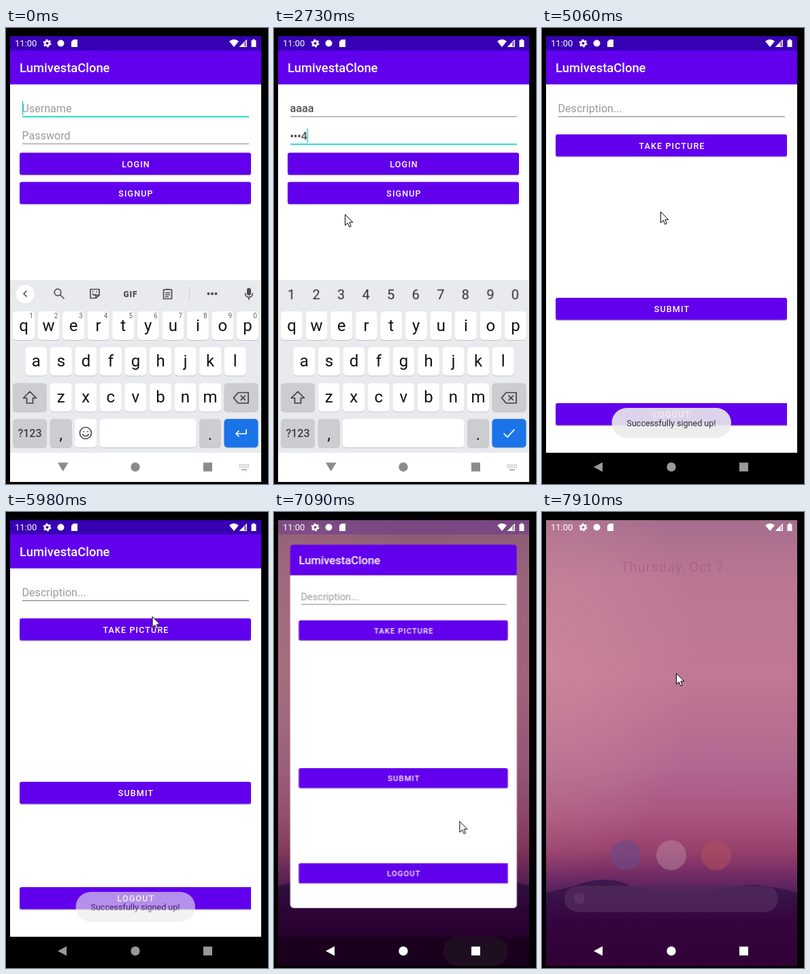
An HTML page that plays this animation: 385 by 671 pixels, repeating every 8 s.

```html
<!DOCTYPE html>
<html lang="en">
<head>
<meta charset="utf-8">
<title>Sign up demo</title>
<style>
  html, body { margin: 0; width: 100%; height: 100%; overflow: hidden; background: #000; }
  svg { display: block; width: 385px; height: 671px; font-family: Roboto, "Noto Sans", sans-serif; }
  .mid { text-anchor: middle; }
  .line { fill: none; stroke: currentColor; stroke-width: 1.7; stroke-linecap: round; stroke-linejoin: round; }
  .btn { fill: #fff; font-size: 12.56px; font-weight: 500; letter-spacing: 1.12px; text-anchor: middle; }
  .title { fill: #fff; font-size: 18.4px; font-weight: 500; }
  .hint { fill: #9a9a9a; font-size: 16.1px; }
  .typed { fill: #252525; font-size: 16.1px; }
  .key { fill: #111; font-size: 24px; text-anchor: middle; }
  #old { transform-origin: 190.5px 355px; }
</style>
</head>
<body>
<svg viewBox="0 0 385 671">
  <defs>
    <linearGradient id="sky" x2="0" y2="1">
      <stop offset="0" stop-color="#a66d8d"/>
      <stop offset=".13" stop-color="#b97794"/>
      <stop offset=".35" stop-color="#c07894"/>
      <stop offset=".55" stop-color="#b16890"/>
      <stop offset=".66" stop-color="#aa5580"/>
      <stop offset=".74" stop-color="#98406b"/>
      <stop offset=".8" stop-color="#6f2a64"/>
      <stop offset=".85" stop-color="#4c1d58"/>
    </linearGradient>
    <radialGradient id="glow" cx="0" cy=".38" r=".6">
      <stop offset="0" stop-color="#d08d9f" stop-opacity=".6"/>
      <stop offset="1" stop-color="#d08d9f" stop-opacity="0"/>
    </radialGradient>
    <linearGradient id="hill" x2="0" y2="1">
      <stop offset="0" stop-color="#3d1a50"/>
      <stop offset=".4" stop-color="#350540"/>
      <stop offset="1" stop-color="#2e0030"/>
    </linearGradient>
    <clipPath id="screen"><path d="M6 12H375V668H6Z"/></clipPath>
    <clipPath id="card"><rect id="cardShape" x="6" y="33" width="369" height="592"/></clipPath>
  </defs>

  <g clip-path="url(#screen)">
    <path d="M6 12H375V668H6Z" fill="url(#sky)"/>
    <path d="M6 12H375V560H6Z" fill="url(#glow)"/>
    <path id="hills" fill="url(#hill)" d="M6 560Q30 555 50 549Q75 540 97 541Q113 541 130 551Q160 557 190 560Q220 557 240 558Q270 553 310 548Q345 551 375 560V690H6Z"/>
    <path id="dim" d="M6 12H375V668H6Z"/>

    <g id="home">
      <text class="mid" x="192" y="88" font-size="20" letter-spacing="1" fill="#a85f86" fill-opacity=".75">Thursday, Oct 7</text>
      <circle cx="123" cy="505" r="22" fill="#6c4a88" fill-opacity=".65"/>
      <circle cx="190" cy="505" r="22" fill="#b88aa2" fill-opacity=".5"/>
      <circle cx="256" cy="505" r="22" fill="#ad4f62" fill-opacity=".6"/>
      <rect x="33" y="550" width="314" height="38.500" rx="19" fill="#50285a" fill-opacity=".85"/>
      <circle cx="55" cy="569" r="8" fill="#5c2f62"/>
    </g>

    <g id="actions" fill="#fff" font-size="13">
      <rect x="73" y="579" width="11.500" height="18" rx="1.500" fill="none" stroke="#fff" stroke-width="2"/>
      <path d="M73 579H84.500V582H73ZM73 594H84.500V597H73Z"/>
      <path class="line" color="#fff" stroke-width="1" d="M76 587V585H78M81.500 589V591H79.500"/>
      <text x="97" y="593">Screenshot</text>
      <path d="M237 579.500H254M237 585H254" stroke="#fff" stroke-width="1.800" stroke-dasharray="1.800 1.500"/>
      <path d="M242 582.500Q243.500 581 245 582.500V589L252 591Q253.500 592 253 593.500L251.500 598H243.500L237.500 592.500L239 591L242 592Z"/>
      <text x="263" y="593">Select</text>
    </g>

    <g id="old">
      <path d="M0 0H385V671H0Z" fill="#fff"/>
      <path d="M0 33H385V83H0Z" fill="#6200ee"/>
      <text class="title" x="20" y="65">LumivestaClone</text>
      <text id="userHint" class="hint" x="23.500" y="124">Username</text>
      <text id="passHint" class="hint" x="23.500" y="164">Password</text>
      <g id="typing"></g>
      <g id="focusUser"><path d="M24 130.500H357" stroke="#1cd6c4" stroke-width="1.800"/><path d="M24 170.500H357" stroke="#8a8a8a"/></g>
      <g id="focusPass"><path d="M24 130.500H357" stroke="#8a8a8a"/><path d="M24 171H357" stroke="#1cd6c4" stroke-width="1.800"/></g>
      <g id="loginButtons"></g>
      <path id="press" d="M20 226.500H360V259H20Z" fill="#fff" fill-opacity=".22"/>
      <path d="M0 371H385V625H0Z" fill="#e8eaed"/>
      <g id="keys"></g>
      <g id="textMode" color="#4a4d51">
        <g id="digitHints" fill="#5f6368" font-size="10"></g>
        <circle cx="28" cy="391.500" r="13.500" fill="#fff"/>
        <path class="line" d="M30 387L26 391L30 395"/>
        <circle class="line" cx="76" cy="389" r="4.800"/><path class="line" d="M80 393L85 398"/>
        <path class="line" d="M124 384.500H137V393L132 397.500H124ZM132 397V393H137M127.500 388H128M133 388H133.500M127 391.500Q130 394 132 392"/>
        <text class="mid" x="183" y="395.500" font-size="12" font-weight="900" letter-spacing=".8" fill="#4a4d51">GIF</text>
        <path class="line" d="M231.500 385H243.500V398.500H231.500ZM235 384.500H240M234.500 389.500H240.500M234.500 392.500H240.500M234.500 395.500H238.500"/>
        <path d="M269.500 382V401" stroke="#cfd1d5"/>
        <path d="M297.500 391H309" stroke="#4a4d51" stroke-width="4" stroke-linecap="round" stroke-dasharray="0 5.500"/>
        <rect x="354" y="382.500" width="6" height="11" rx="3" fill="#4a4d51"/>
        <path class="line" d="M351.500 390.500Q352 396 357 396Q362 396 362.500 390.500M357 396V399.500"/>
        <g id="emoji"></g>
        <circle class="line" cx="117" cy="596" r="8.500"/>
        <path class="line" d="M114 593.500V594M120 593.500V594M112.500 598Q117 603.500 121.500 598"/>
        <path class="line" color="#fff" d="M353 591V597H338M342 593L338 597L342 601"/>
      </g>
      <g id="passMode">
        <g id="digits" fill="#2c2e31" font-size="20"></g>
        <path class="line" color="#fff" d="M338 597L343 602L353 591"/>
      </g>
    </g>
    <g id="oldNav" fill="#8b8b8b">
      <path d="M76 639.500H91.500L83.700 652.500Z"/><circle cx="190" cy="646" r="6.700"/><path d="M290 639.500H303V652.500H290Z"/>
      <path d="M343 643H357M343 646H357" stroke="#999" stroke-width="1.600" stroke-dasharray="1.600 1.400"/><path d="M346 650H354" stroke="#999" stroke-width="1.500"/>
    </g>

    <g id="main">
      <g clip-path="url(#card)">
        <path d="M6 33H375V625H6Z" fill="#fff"/>
        <path d="M6 33H375V83H6Z" fill="#6200ee"/>
        <text class="title" x="20" y="65">LumivestaClone</text>
        <text class="hint" x="23.500" y="124">Description...</text>
        <path d="M24 130.500H357" stroke="#777"/>
        <g id="mainButtons"></g>
      </g>
      <circle id="badge" cx="190.500" cy="33" r="25.500" fill="#3ddc84"/>
    </g>

    <path id="statusBg" d="M6 12H375V33H6Z" fill="#3700b3"/>
    <g fill="#fff">
      <text x="13" y="27.300" font-size="13">11:00</text>
      <circle cx="60.500" cy="22.500" r="3.300" fill="none" stroke="#fff" stroke-width="2.600"/>
      <circle cx="60.500" cy="22.500" r="5" fill="none" stroke="#fff" stroke-width="2" stroke-dasharray="2.600 2.636"/>
      <circle cx="80.500" cy="22.500" r="5"/>
      <path d="M99 17H105V28H96V20Z"/>
      <path d="M328 19.500Q335 14 342 19.500L335 28Z"/>
      <path d="M354 17V28H343Z" fill-opacity=".45"/><path d="M350 21V28H343Z"/><path class="line" color="#fff" style="stroke-width:1" d="M353.500 18V27.500H344Z"/>
      <path d="M362.500 16.500H365.500V18H367.500V28H360.500V18H362.500Z"/>
    </g>

    <path id="navBg" d="M6 625H375V668H6Z"/>
    <rect id="ripple" x="249" y="625" width="95" height="43" rx="21.500" fill="#292929"/>
    <g id="nav">
      <path d="M76 646L89 639V653Z"/><circle cx="190" cy="646" r="6.700"/><path d="M290 639.500H303V652.500H290Z"/>
    </g>

    <g id="toast">
      <rect x="102.500" y="559" width="175.500" height="44" rx="22" fill="#ebebeb" fill-opacity=".9"/>
      <text class="mid" x="190" y="586" font-size="12.560" fill="#333">Successfully signed up!</text>
    </g>

    <g id="pointer">
      <circle id="click" cy="-2" r="12" fill="#fae93c" fill-opacity=".6"/>
      <path d="M.5 .5V16.500L4.200 13L6.700 18.800L9.200 17.700L6.800 12H11.800Z" fill="#fff" stroke="#000"/>
    </g>
  </g>
</svg>

<script>
  const $ = id => document.getElementById(id);
  const rules = [];

  // Steps are [ms, declarations] on the 8 s loop.
  function track(id, steps, ease = 'linear') {
    const name = 'k' + rules.length;
    const body = steps.map(([ms, css]) => `${ms / 80}%{${css}}`).join('');
    rules.push(`@keyframes ${name}{${body}}#${id}{animation:${name} 8s ${ease} infinite}`);
  }
  const fade = (id, ...steps) => track(id, steps.map(([ms, o]) => [ms, `opacity:${o}`]));
  // Each time toggles visibility, starting hidden.
  function show(id, ...times) {
    const steps = [[0, 'opacity:0'], ...times.map((ms, i) => [ms, `opacity:${(i + 1) % 2}`])];
    if (times[times.length - 1] < 8000) steps.push([8000, `opacity:${times.length % 2}`]);
    track(id, steps, 'step-end');
  }

  const button = (y, label, r = 3) =>
    `<rect x="20" y="${y + 1}" width="340" height="33" rx="${r}" fill="#000" fill-opacity=".2"/>` +
    (r ? `<rect x="20" y="${y}" width="340" height="32.5" rx="${r}" fill="#6200ee"/>`
       : `<path d="M360 ${y}V${y + 32.5}H23Q20 ${y + 32.5} 20 ${y + 29.5}V${y + 3}Q20 ${y} 23 ${y}Z" fill="#6200ee"/>`) +
    `<text class="btn" x="191" y="${y + 21}">${label}</text>`;
  $('loginButtons').innerHTML = button(183.5, 'LOGIN') + button(226.5, 'SIGNUP');
  $('mainButtons').innerHTML = button(156.5, 'TAKE PICTURE') + button(397, 'SUBMIT') + button(552, 'LOGOUT', 0);

  const cap = (x, y, w, fill = '#fff') =>
    `<rect x="${x}" y="${y + 1}" width="${w}" height="42" rx="5" fill="#c3c5c9"/>` +
    `<rect x="${x}" y="${y}" width="${w}" height="42" rx="5" fill="${fill}"/>`;
  const row = (letters, x0, y) => [...letters].map((c, i) => {
    const x = x0 + 36.55 * i;
    return cap(x, y, 32) + `<text class="key" x="${x + 16}" y="${y + 28.5}">${c}</text>`;
  }).join('');
  const grey = '#cbcdd1';
  $('keys').innerHTML =
    row('qwertyuiop', 10, 417) + row('asdfghjkl', 28.3, 469.5) + row('zxcvbnm', 64.7, 522.5) +
    cap(10, 522.5, 50, grey) + cap(320.5, 522.5, 50, grey) +
    cap(10, 575.3, 50, grey) + cap(64.7, 575.3, 32, grey) + cap(101, 575.3, 178.5) +
    cap(284, 575.3, 32, grey) + cap(320.5, 575.3, 50, '#1a73e8') +
    `<g color="#3c4043"><path class="line" d="M35 535L44.500 544.500H39.500V552H30.500V544.500H25.500Z"/>
     <path class="line" d="M341 536.500H356V552H341L334.500 544.200ZM345 541L351.500 547.500M351.500 541L345 547.500"/></g>
     <text class="mid" x="35" y="602" font-size="16" font-weight="500" fill="#3c4043">?123</text>
     <text class="key" x="80.500" y="606">,</text><text class="key" x="300" y="606">.</text>`;
  // Gap between the emoji key and the shorter space bar.
  $('emoji').innerHTML = '<path d="M101 575H145V619H101Z" fill="#e8eaed"/>' + cap(101, 575.3, 32) + cap(137.5, 575.3, 142);
  const numbers = [...'1234567890'];
  $('digitHints').innerHTML = numbers.map((n, i) => `<text class="mid" x="${37 + 36.55 * i}" y="427">${n}</text>`).join('');
  $('digits').innerHTML = '<path d="M6 371H375V411H6Z" fill="#e8eaed"/>' +
    numbers.map((n, i) => `<text class="mid" x="${25.5 + 36.55 * i}" y="399">${n}</text>`).join('');

  // Typed states: each is shown until the next one begins.
  const caret = (x, y) => `<path d="M${x} ${y}v20.500" stroke="#1cd6c4" stroke-width="1.500"/>`;
  const focusAt = 1700;
  const userAt = [100, 300, 500, 700, focusAt], passAt = [2130, 2330, 2530, 2730, 8000];
  let typing = `<g id="c0">${caret(24.5, 107.5)}</g><g id="c1">${caret(58.8, 107.5)}</g><g id="c2">${caret(24.5, 148)}</g>`;
  for (let i = 0; i < 4; i++) {
    typing += `<text id="u${i}" class="typed" x="23.500" y="124">${'a'.repeat(i + 1)}</text>`;
    typing += `<g id="p${i}"><text class="typed" x="23.500" y="164">${'•'.repeat(i)}${i + 1}</text>${caret(33 + 5.4 * i, 148)}</g>`;
    show('u' + i, userAt[i], i < 3 ? userAt[i + 1] : 8000);
    show('p' + i, passAt[i], passAt[i + 1]);
  }
  $('typing').innerHTML = typing;
  show('c0', 0, 100);
  show('c1', 700, 1200);
  show('c2', focusAt, 2130);
  show('userHint', 0, 100);
  show('passHint', 0, 2130);
  show('focusUser', 0, focusAt);
  show('focusPass', focusAt, 8000);
  show('textMode', 0, focusAt + 100);
  show('passMode', focusAt + 100, 8000);
  fade('press', [0, 0], [3240, 0], [3340, 1], [3440, 1], [3660, 0], [8000, 0]);

  const grow = (s, o = 1) => `transform:scale(${s});opacity:${o}`;
  track('old', [[0, grow(1)], [3760, grow(1)], [3960, grow(1.007)], [4060, grow(1.007)],
    [4260, grow(1.03)], [4270, grow(1.03, 0)], [8000, grow(1, 0)]]);
  show('oldNav', 0, 4210);

  const place = (x, y, s, o = 1) => `transform:translate(${x}px,${y}px) scale(${s});opacity:${o}`;
  track('main', [[0, place(19, 34, .9, 0)], [4060, place(19, 34, .9, 0)], [4260, place(0, 0, 1)], [6980, place(0, 0, 1)],
    [7250, place(44.4, 43.7, .7656)], [7590, place(44.4, 43.7, .7656)], [7750, place(44.4, -500, .7656)],
    [7755, place(44.4, -500, .7656, 0)], [8000, place(44.4, -500, .7656, 0)]]);
  track('cardShape', [[0, 'rx:0px'], [6980, 'rx:0px'], [7150, 'rx:9px'], [8000, 'rx:9px']]);
  fade('badge', [0, 0], [7100, 0], [7280, 1], [8000, 1]);
  fade('actions', [0, 0], [7150, 0], [7350, 1], [7590, 1], [7750, 0], [8000, 0]);
  fade('dim', [0, .17], [7650, .17], [7850, 0], [8000, 0]);
  fade('home', [0, 0], [7780, 0], [7910, 1], [8000, 1]);
  track('hills', [[0, 'transform:translateY(-10px)'], [7650, 'transform:translateY(-10px)'],
    [7850, 'transform:translateY(0px)'], [8000, 'transform:translateY(0px)']]);
  fade('statusBg', [0, 1], [6980, 1], [7120, 0], [8000, 0]);
  fade('navBg', [0, 0], [4160, 0], [4260, 1], [6980, 1], [7150, 0], [8000, 0]);
  track('nav', [[0, 'fill:#999;opacity:0'], [4210, 'fill:#999;opacity:1'], [6580, 'fill:#fff;opacity:1'],
    [8000, 'fill:#fff;opacity:1']], 'step-end');
  fade('ripple', [0, 0], [6580, 0], [6690, 1], [6980, 1], [7150, 0], [8000, 0]);
  fade('toast', [0, 0], [3860, 0], [3960, .85], [4060, .85], [4160, 1], [5900, 1], [6150, 0], [8000, 0]);

  // Pointer path: ms, x, y
  const path = [
    [0, 230, 446], [600, 230, 446], [900, 200, 400], [1200, 150, 300], [1420, 112, 170], [1600, 107, 148], [1720, 107, 148],
    [1880, 90, 183], [2130, 104, 274], [2830, 104, 274], [3030, 158, 268], [3240, 178, 243], [3440, 178, 243],
    [3660, 174, 262], [3950, 168, 288], [4360, 168, 288], [4660, 312, 590], [4860, 145, 400], [5050, 174, 270], [5150, 174, 270],
    [5280, 172, 240], [5600, 150, 165], [5850, 225, 135], [6100, 205, 170], [6300, 215, 200], [6580, 293, 640], [6700, 293, 640],
    [6880, 281, 479], [6980, 281, 479], [7250, 260, 420], [7480, 248, 374], [7590, 248, 374], [7750, 215, 180],
    [7900, 197, 237], [8000, 197, 237]];
  track('pointer', path.map(([ms, x, y]) => [ms, `transform:translate(${x}px,${y}px);opacity:${ms < 600 ? 0 : 1}`]));
  show('click', 1600, 1720, 3240, 3400, 6580, 6680, 7450, 7720);

  document.head.appendChild(document.createElement('style')).textContent = rules.join('\n');
</script>
</body>
</html>
```
